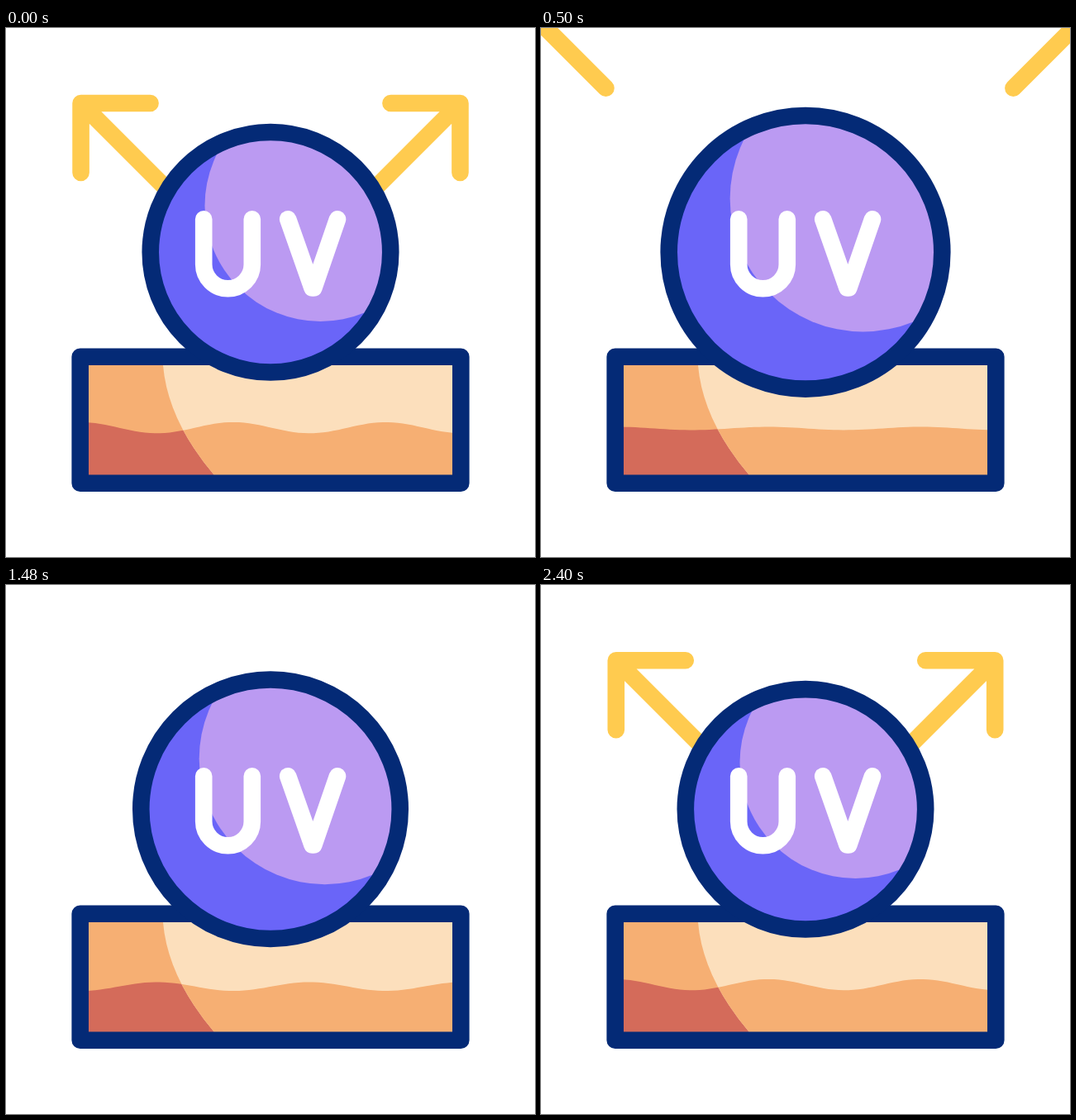
An HTML page that plays this animation: 640 by 640 pixels, repeating every 2420 ms.

```html
<!DOCTYPE html>
<html lang="en">
<head>
<meta charset="utf-8">
<title>UV reflection</title>
<style>
  html, body { margin: 0; width: 100%; height: 100%; overflow: hidden; background: #fff; }
  svg { display: block; width: 100vw; height: 100vh; }
  .line { fill: none; stroke-width: 20.6; stroke-linecap: round; stroke-linejoin: round; }
  .navy { stroke: #042a76; }
  .sun { stroke: #ffcb4f; }
  .white { stroke: #fff; }
</style>
</head>
<body>
<svg viewBox="0 0 640 640">
  <defs>
    <clipPath id="slabClip"><rect x="90" y="398" width="460" height="153"/></clipPath>
    <clipPath id="lightClip"><path d="M190 398V408Q195.7 474.7 252 541L259 551H550V398Z"/></clipPath>
    <clipPath id="ballClip"><circle id="ballEdge" cx="320" cy="271.3"/></clipPath>
  </defs>

  <path id="left" class="line sun" d="M175 0H0V0" />
  <path id="right" class="line sun" d="M0 0" />

  <g clip-path="url(#slabClip)">
    <rect x="90" y="398" width="460" height="153" fill="#f6af73"/>
    <path class="wave" fill="#d46b5a"/>
    <g clip-path="url(#lightClip)">
      <rect x="90" y="398" width="460" height="153" fill="#fcdfbc"/>
      <path class="wave" fill="#f6af73"/>
    </g>
  </g>
  <rect class="line navy" x="89.7" y="397.7" width="460.6" height="153"/>

  <g clip-path="url(#ballClip)">
    <rect x="120" y="70" width="400" height="400" fill="#6a65f8"/>
    <circle id="glow" fill="#bb9af2"/>
  </g>
  <circle id="ring" class="line navy" cx="320" cy="271.3"/>

  <path class="line white" d="M239.2 231.3V286a29.3 29.3 0 0 0 58.6 0V231.3"/>
  <path class="line white" d="M341.2 231.3L370.4 314.4H372.4L401 231.3"/>
</svg>
<script>
const LOOP = 2420;
const $ = id => document.getElementById(id);
const waves = document.querySelectorAll('.wave');
const clamp = u => Math.min(1, Math.max(0, u));

// cubic-bezier(.42, 0, .58, 1)
function easeInOut(x) {
  let lo = 0, hi = 1, s = 0.5;
  for (let i = 0; i < 20; i++) {
    s = (lo + hi) / 2;
    const v = 1 - s;
    if (1.26 * v * v * s + 1.74 * v * s * s + s * s * s < x) lo = s; else hi = s;
  }
  return s * s * (3 - 2 * s);
}

function drawBall(t) {
  const grow = clamp(t / 383) - clamp((t - 1010) / 1105);
  const inner = 135 + 20.1 * grow;
  const k = inner / 135;
  $('ballEdge').setAttribute('r', inner + 3);
  $('ring').setAttribute('r', inner + 10.2);
  $('glow').setAttribute('cx', 320 + 60.5 * k);
  $('glow').setAttribute('cy', 271.3 - 56.3 * k);
  $('glow').setAttribute('r', 140 * k);
}

function drawWave(t) {
  const half = LOOP / 2;
  const c = 1 - 2 * easeInOut(1 - Math.abs(t - half) / half);
  let d = 'M90 560';
  for (let x = 90; x <= 552; x += 6) {
    const y = 484.8 - 1.2 * c - 6.7 * c * Math.cos((x - 90.5) / 184.5 * 2 * Math.PI);
    d += `L${x} ${y.toFixed(2)}`;
  }
  waves.forEach(w => w.setAttribute('d', d + 'V560Z'));
}

function drawArrow(el, x, y, dir) {
  el.setAttribute('d',
    `M${x + dir * 84} ${y}H${x}V${y + 84}M${x} ${y}L${x + dir * 105} ${y + 105}`);
}

function drawArrows(t) {
  const leaving = t < 1000, shown = leaving || t > 1700;
  for (const id of ['left', 'right']) $(id).style.display = shown ? '' : 'none';
  if (!shown) return;
  const d = leaving ? 0.2465 * t : Math.min(0, 0.2416 * (t - 2400));
  const kl = leaving ? 0.95 : 0.985, kr = leaving ? 1.03 : 0.97;
  drawArrow($('left'), 90.8 - kl * d, 91.2 - d, 1);
  drawArrow($('right'), 549.2 + kr * d, 91.2 - d, -1);
}

const start = performance.now();
function frame(now) {
  const t = Math.max(0, now - start) % LOOP;
  drawArrows(t);
  drawWave(t);
  drawBall(t);
  requestAnimationFrame(frame);
}
frame(start);
</script>
</body>
</html>
```
